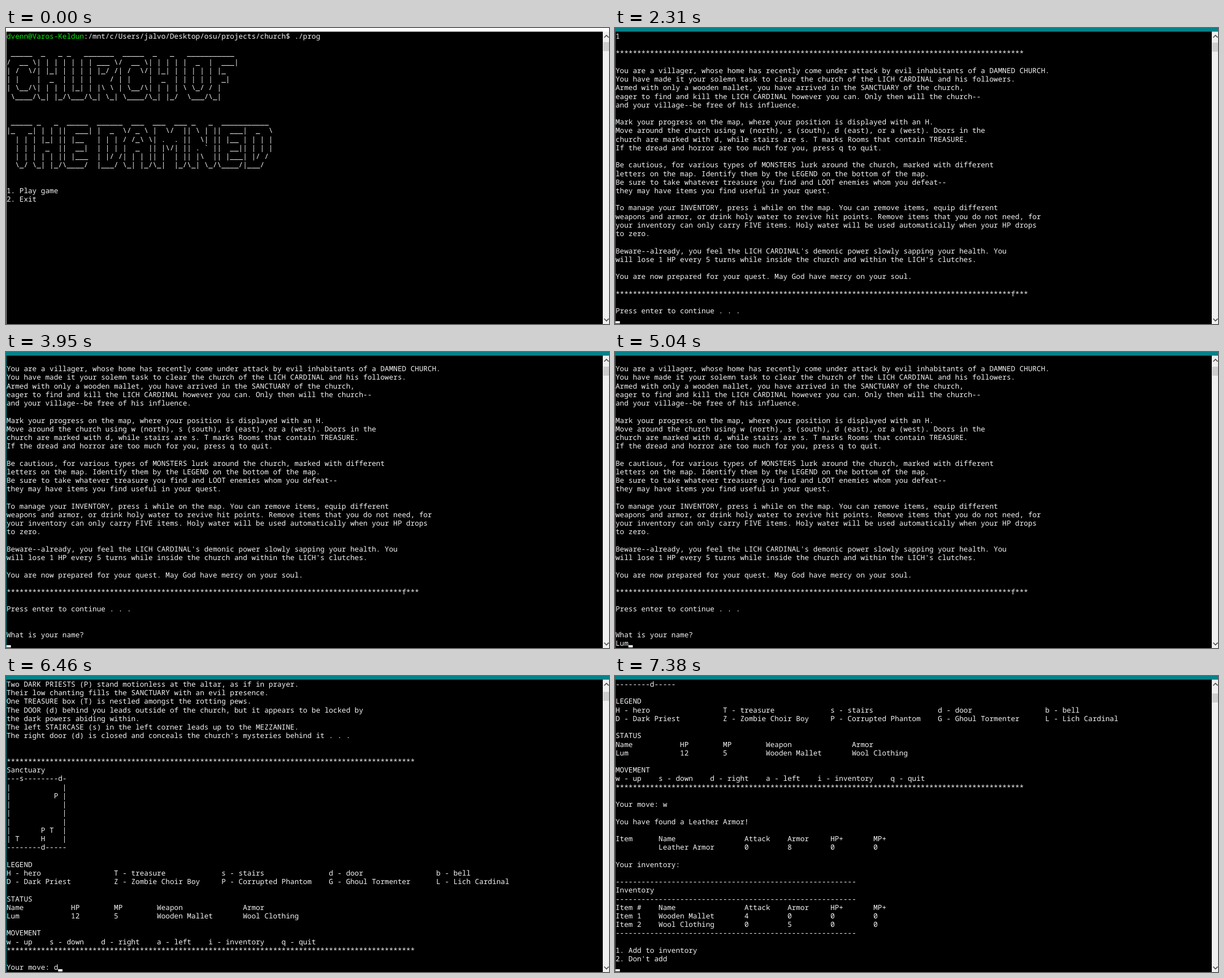
These frames come from a looping animation (1067 px wide and 525 px high, 8000 ms). An HTML page:

```html
<!DOCTYPE html>
<html lang="en">
<head>
<meta charset="utf-8">
<title>Terminal game</title>
<style>
  html, body { margin: 0; width: 100%; height: 100%; overflow: hidden; background: #000; }
  svg { display: block; }
  text {
    font: 12.68px "Noto Sans Mono", "DejaVu Sans Mono", monospace;
    white-space: pre;
    text-rendering: geometricPrecision;
    font-variant-ligatures: none;
    fill: #f5f5f5;
  }
  #user { fill: #00f000; }
</style>
</head>
<body>
<svg width="1067" height="525" viewBox="0 0 1067 525" xml:space="preserve">
  <rect width="1067" height="525"/>
  <g id="rows"></g>
  <text id="user" x="1" y="19"></text>
  <rect id="cursor" width="7.6" height="4" fill="#fff"/>
  <rect id="edge" width="1" height="525"/>
  <rect x="1056" width="11" height="525" fill="#f0f0f0"/>
  <rect id="thumb" x="1057" width="10" height="16" fill="#cdcdcd"/>
  <path d="M1058.5 17l4-4 4 4M1058.5 515.5l4 4 4-4" fill="none" stroke="#505050" stroke-width="1.6"/>
  <rect id="bar" width="1067" height="6.5"/>
</svg>
<script>
const LOOP = 8000, ROWS = 34, CELL_W = 7.608, LINE_H = 15.22;
const FOCUS_TIME = 690;
const USER = 'dvenn@Varos-Keldun', HERO = 'Lum';
const $ = id => document.getElementById(id);

// Places each cell at its column stop.
const cols = (stops, ...cells) =>
  cells.reduce((line, cell, i) => line.padEnd(stops[i]) + cell, '');

const STARS = '*'.repeat(95);
const DASHES = '-'.repeat(56);
const LEGEND = [0, 25, 50, 75, 100];
const STATUS = [0, 15, 25, 35, 55];
const ITEMS = [0, 10, 30, 40, 50, 60];

const title = String.raw`${' '.repeat(USER.length)}:/mnt/c/Users/jalvo/Desktop/osu/projects/church$ ./prog

 _____  _   _ _   _______  _____  _   _   ___________
/  __ \| | | | | | | ___ \/  __ \| | | | |  _  |  ___|
| /  \/| |_| | | | | |_/ /| /  \/| |_| | | | | | |_
| |    |  _  | | | |    / | |    |  _  | | | | |  _|
| \__/\| | | | |_| | |\ \ | \__/\| | | | \ \_/ / |
 \____/\_| |_/\___/\_| \_| \____/\_| |_/  \___/\_|


 _____ _   _  _____  ______  ___  ___  ___ _   _  ___________
|_   _| | | ||  ___| |  _  \/ _ \ |  \/  || \ | ||  ___|  _  \
  | | | |_| || |__   | | | / /_\ \| .  . ||  \| || |__ | | | |
  | | |  _  ||  __|  | | | |  _  || |\/| || . ${'`'} ||  __|| | | |
  | | | | | || |___  | |/ /| | | || |  | || |\  || |___| |/ /
  \_/ \_| |_/\____/  |___/ \_| |_/\_|  |_/\_| \_/\____/|___/


1. Play game
2. Exit
`;

const intro = `

${STARS}

You are a villager, whose home has recently come under attack by evil inhabitants of a DAMNED CHURCH.
You have made it your solemn task to clear the church of the LICH CARDINAL and his followers.
Armed with only a wooden mallet, you have arrived in the SANCTUARY of the church,
eager to find and kill the LICH CARDINAL however you can. Only then will the church--
and your village--be free of his influence.

Mark your progress on the map, where your position is displayed with an H.
Move around the church using w (north), s (south), d (east), or a (west). Doors in the
church are marked with d, while stairs are s. T marks Rooms that contain TREASURE.
If the dread and horror are too much for you, press q to quit.

Be cautious, for various types of MONSTERS lurk around the church, marked with different
letters on the map. Identify them by the LEGEND on the bottom of the map.
Be sure to take whatever treasure you find and LOOT enemies whom you defeat--
they may have items you find useful in your quest.

To manage your INVENTORY, press i while on the map. You can remove items, equip different
weapons and armor, or drink holy water to revive hit points. Remove items that you do not need, for
your inventory can only carry FIVE items. Holy water will be used automatically when your HP drops
to zero.

Beware--already, you feel the LICH CARDINAL's demonic power slowly sapping your health. You
will lose 1 HP every 5 turns while inside the church and within the LICH's clutches.

You are now prepared for your quest. May God have mercy on your soul.

${'*'.repeat(92)}f***

Press enter to continue . . .
`;

const room = `

Two DARK PRIESTS (P) stand motionless at the altar, as if in prayer.
Their low chanting fills the SANCTUARY with an evil presence.
One TREASURE box (T) is nestled amongst the rotting pews.
The DOOR (d) behind you leads outside of the church, but it appears to be locked by
the dark powers abiding within.
The left STAIRCASE (s) in the left corner leads up to the MEZZANINE.
The right door (d) is closed and conceals the church's mysteries behind it . . .`;

const wall = (...things) =>
  cols([0, ...things.map(([col]) => col), 13], '|', ...things.map(([, mark]) => mark), '|');

const turn = heroCol => `


${STARS}
Sanctuary
---s--------d-
${wall()}
${wall([11, 'P'])}
${wall()}
${wall()}
${wall()}
${wall([8, 'P'], [10, 'T'])}
${wall([2, 'T'], [heroCol, 'H'])}
--------d-----

LEGEND
${cols(LEGEND, 'H - hero', 'T - treasure', 's - stairs', 'd - door', 'b - bell')}
${cols(LEGEND, 'D - Dark Priest', 'Z - Zombie Choir Boy', 'P - Corrupted Phantom', 'G - Ghoul Tormenter', 'L - Lich Cardinal')}

STATUS
${cols(STATUS, 'Name', 'HP', 'MP', 'Weapon', 'Armor')}
${cols(STATUS, HERO, '12', '5', 'Wooden Mallet', 'Wool Clothing')}

MOVEMENT
w - up    s - down    d - right    a - left    i - inventory    q - quit
${STARS}

Your move: `;

const item = (...cells) => cols(ITEMS, ...cells);
const itemHead = label => item(label, 'Name', 'Attack', 'Armor', 'HP+', 'MP+');

const loot = `

You have found a Leather Armor!

${itemHead('Item')}
${item('', 'Leather Armor', 0, 8, 0, 0)}

Your inventory:

${DASHES}
Inventory
${DASHES}
${itemHead('Item #')}
${item('Item 1', 'Wooden Mallet', 4, 0, 0, 0)}
${item('Item 2', 'Wool Clothing', 0, 5, 0, 0)}
${DASHES}

1. Add to inventory
2. Don't add
`;

// Each step: time, output added to the log, cursor shown, scroll thumb top.
let log = '';
const steps = [
  [0, title, false, 25],
  [1220, '', true, 25],
  [1450, '1', true, 25],
  [2230, '', false, 25],
  [2310, intro, true, 26],
  [3320, '', false, 26],
  [3870, '', true, 26],
  [3950, '\n\nWhat is your name?\n', true, 26],
  [4650, HERO[0], true, 26],
  [4950, HERO[1], true, 26],
  [5040, HERO[2], true, 26],
  [5350, room + turn(8), true, 28],
  [5970, '', false, 28],
  [6460, 'd', true, 28],
  [6600, turn(9), true, 29],
  [6840, 'd', true, 29],
  [6980, turn(10), true, 30],
  [7300, 'w', true, 30],
  [7380, loot, true, 31],
].map(([time, output, cursor, thumb]) => {
  log += output;
  return { time, lines: log.split('\n'), cursor, thumb };
});

const rows = Array.from({ length: ROWS }, (_, i) => {
  const row = document.createElementNS('http://www.w3.org/2000/svg', 'text');
  row.setAttribute('x', 1);
  row.setAttribute('y', 19 + i * LINE_H);
  return $('rows').appendChild(row);
});

function showStep({ lines, cursor, thumb }) {
  const top = Math.max(0, lines.length - ROWS);
  rows.forEach((row, i) => { row.textContent = lines[top + i] || ''; });
  $('user').textContent = top ? '' : USER;
  $('thumb').setAttribute('y', thumb);
  $('cursor').setAttribute('x', 1 + lines.at(-1).length * CELL_W);
  $('cursor').setAttribute('y', 520 + (lines.length - 1 - top - 33) * LINE_H);
  $('cursor').setAttribute('visibility', cursor ? 'visible' : 'hidden');
}

let shown;
function render(time) {
  const step = steps.findLast(s => s.time <= time);
  if (step !== shown) showStep(shown = step);
  const focused = time >= FOCUS_TIME;
  $('bar').setAttribute('fill', focused ? '#04828a' : '#fff');
  $('edge').setAttribute('fill', focused ? '#04828a' : '#aaa');
}

const start = performance.now();
function tick() {
  render((performance.now() - start) % LOOP);
  requestAnimationFrame(tick);
}
tick();
</script>
</body>
</html>
```
